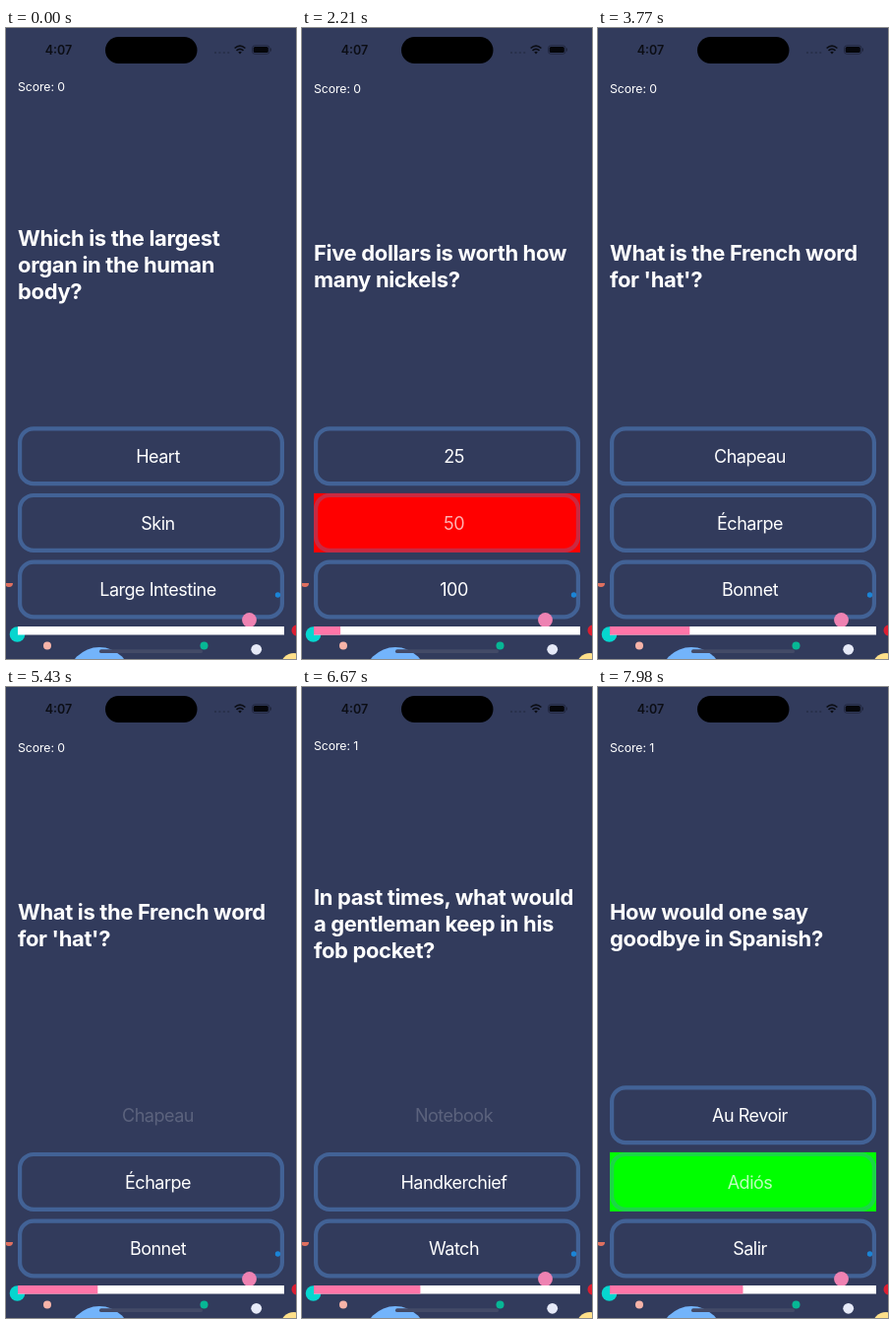
Write an HTML page that moves like this. It is 295 px wide and 640 px high and loops after 8000 ms.

```html
<!DOCTYPE html>
<html lang="en">
<head>
<meta charset="utf-8">
<title>Quiz</title>
<style>
  html, body { margin: 0; width: 100%; height: 100%; overflow: hidden; background: #323b5c; }
  svg { display: block; width: 100vw; height: 100vh; }
  text { font-family: Inter, "Liberation Sans", sans-serif; fill: #fff; }
  #question { font-size: 22px; font-weight: 700; letter-spacing: -.35px; }
  #score { font-size: 12.3px; letter-spacing: -.1px; }
  .answer text { font-size: 18px; letter-spacing: -.5px; text-anchor: middle; }
  .frame { fill: none; stroke: #5289d0; stroke-opacity: .5; stroke-width: 4.2; }
</style>
</head>
<body>
<svg id="stage" viewBox="0 0 295 640">
  <rect width="295" height="640" fill="#323b5c"/>
  <g id="status">
    <rect x="101" y="9" width="93.5" height="27" rx="13.5"/>
    <text x="53.5" y="26.5" text-anchor="middle" font-size="12.5" font-weight="600" style="fill:#0b0d14">4:07</text>
    <path d="M212 25h2m2.400 0h2m2.400 0h2m2.400 0h2" stroke="#1d2338" stroke-width="1.6" opacity=".6"/>
    <path d="M232.600 20.500q5.400-4.800 10.800 0M234.500 22.800q3.500-3 7 0" fill="none" stroke="#0b0d14" stroke-width="1.600"/>
    <path d="M236.200 24.600q1.800-1.500 3.600 0l-1.800 1.900z" fill="#0b0d14"/>
    <rect x="250.500" y="17.800" width="17.500" height="8.500" rx="2.600" fill="none" stroke="#1d2338" stroke-width=".8"/>
    <rect x="251.700" y="19" width="15.100" height="6.100" rx="1.600" fill="#05060a"/>
    <path d="M269.300 20.500v3" stroke="#1d2338"/>
  </g>
  <text id="score" x="12"/>
  <text id="question"/>
  <g id="bubbles">
    <path d="M-1 563h8a4 4 0 0 1-8 0" fill="#e0705f"/>
    <circle cx="276.500" cy="575" r="2.700" fill="#1b84d6"/>
    <circle cx="247.500" cy="600.500" r="7.400" fill="#ee82b2"/>
    <circle cx="11.500" cy="615" r="7.800" fill="#06d6cf"/>
    <circle cx="42" cy="626.500" r="4" fill="#f7b3a8"/>
    <circle cx="201.500" cy="626.500" r="4" fill="#07b795"/>
    <circle cx="254.700" cy="630.300" r="5.400" fill="#e6eaf8"/>
    <circle cx="95" cy="660" r="32" fill="#73b4fb"/>
    <circle cx="293" cy="648" r="14" fill="#ffe08a"/>
    <circle cx="296" cy="611" r="5.500" fill="#dc1e32"/>
  </g>
  <g id="bar">
    <rect x="12" y="607" width="271" height="8.500" fill="#fff"/>
    <rect id="progress" x="12" y="607" height="8.500" fill="#ff75a8"/>
  </g>
  <rect x="95" y="630.300" width="105" height="3.800" rx="1.900" fill="#434a67"/>
</svg>
<script>
const LOOP = 8000;
const FLASH = 220;                    // coloured answer, until the next question
const FADE_OUT = 180, FADE_IN = 280;  // old titles leave, new ones arrive
const RECOVER = 470;                  // a released button returns to full strength
const RED = '#f00', GREEN = '#0f0';

// Each round: question lines, answers, picked answer, result, touch and release times
const rounds = [
  { lines: ['Which is the largest', 'organ in the human', 'body?'],
    answers: ['Heart', 'Skin', 'Large Intestine'], pick: 0, color: RED, touch: 740, release: 795 },
  { lines: ['Five dollars is worth how', 'many nickels?'],
    answers: ['25', '50', '100'], pick: 1, color: RED, touch: 1910, release: 2030 },
  { lines: ['What do the letters in the', 'GMT time zone stand for?'],
    answers: ['Global Meridian Time', 'Greenwich Mean Time', 'General Median Time'],
    pick: 2, color: RED, touch: 2970, release: 3090 },
  { lines: ['What is the French word', "for 'hat'?"],
    answers: ['Chapeau', 'Écharpe', 'Bonnet'], pick: 0, color: GREEN, touch: 5430, release: 5490 },
  { lines: ['In past times, what would', 'a gentleman keep in his', 'fob pocket?'],
    answers: ['Notebook', 'Handkerchief', 'Watch'], pick: 0, color: RED, touch: 6670, release: 6820 },
  { lines: ['How would one say', 'goodbye in Spanish?'],
    answers: ['Au Revoir', 'Adiós', 'Salir'], pick: 1, color: GREEN, touch: 7680, release: 7780 }
];

const byId = id => document.getElementById(id);
const stage = byId('stage'), bubbles = byId('bubbles'), bar = byId('bar');
const clamp = x => Math.max(0, Math.min(1, x));
const easeOut = x => 1 - (1 - x) ** 2;

function add(parent, tag, attrs) {
  const node = document.createElementNS('http://www.w3.org/2000/svg', tag);
  for (const name in attrs) node.setAttribute(name, attrs[name]);
  return parent.appendChild(node);
}

const buttons = [404.3, 471.9, 539.5].map(y => {
  const group = add(stage, 'g', { class: 'answer' });
  return {
    group,
    fill: add(group, 'rect', { x: 12, y, width: 271, height: 60 }),
    frame: add(group, 'rect', { class: 'frame', x: 14.1, y: y + 2.1, width: 266.8, height: 55.8, rx: 14 }),
    label: add(group, 'text', { x: 154.5, y: y + 36.7 })
  };
});

let shown = -1;
function showQuestion(index) {
  if (index === shown) return;
  shown = index;
  const { lines } = rounds[index];
  const tall = lines.length === 3;
  const question = byId('question');
  question.textContent = '';
  lines.forEach((line, i) => {
    add(question, 'tspan', { x: 12, y: (tall ? 221 : 236) + 27 * i }).textContent = line;
  });
  const score = rounds.slice(0, index).filter(r => r.color === GREEN).length;
  byId('score').textContent = 'Score: ' + score;
  byId('score').setAttribute('y', tall ? 64 : 65.5);
  byId('progress').setAttribute('width', 27.1 * index);
}

// Index of the first round that is not over, counting `extra` ms after its release
function roundAt(t, extra) {
  const next = rounds.findIndex(r => t < r.release + extra);
  return next < 0 ? rounds.length - 1 : next;
}

function render(t) {
  showQuestion(roundAt(t, FLASH));

  // Titles change later than the question: out in white, in from dark
  const index = roundAt(t, FLASH + FADE_OUT);
  const titles = rounds[index];
  const born = index ? rounds[index - 1].release + FLASH + FADE_OUT : -FADE_IN;
  const fadeIn = clamp((t - born) / FADE_IN);
  const fadeOut = clamp((t - titles.release - FLASH) / FADE_OUT);
  const tone = Math.round(255 * fadeIn);
  const titleAlpha = (.15 + .85 * fadeIn) * (1 - fadeOut);

  // The last button touched keeps recovering into the next round
  const active = rounds.filter(r => t >= r.touch).pop();

  buttons.forEach((b, i) => {
    const pressed = active && active.pick === i;
    const back = pressed ? easeOut(clamp((t - active.release) / RECOVER)) : 1;
    const flashing = pressed && t >= active.release && t < active.release + FLASH;
    b.fill.style.fill = flashing ? active.color : 'none';
    b.frame.style.opacity = back;
    b.label.textContent = titles.answers[i];
    b.label.style.fill = `rgb(${tone},${tone},${tone})`;
    b.label.style.opacity = titleAlpha * (.2 + .8 * back);
    stage.insertBefore(b.group, flashing ? bar : bubbles);
  });
}

function tick() {
  render(performance.now() % LOOP);
  requestAnimationFrame(tick);
}
tick();
</script>
</body>
</html>
```
